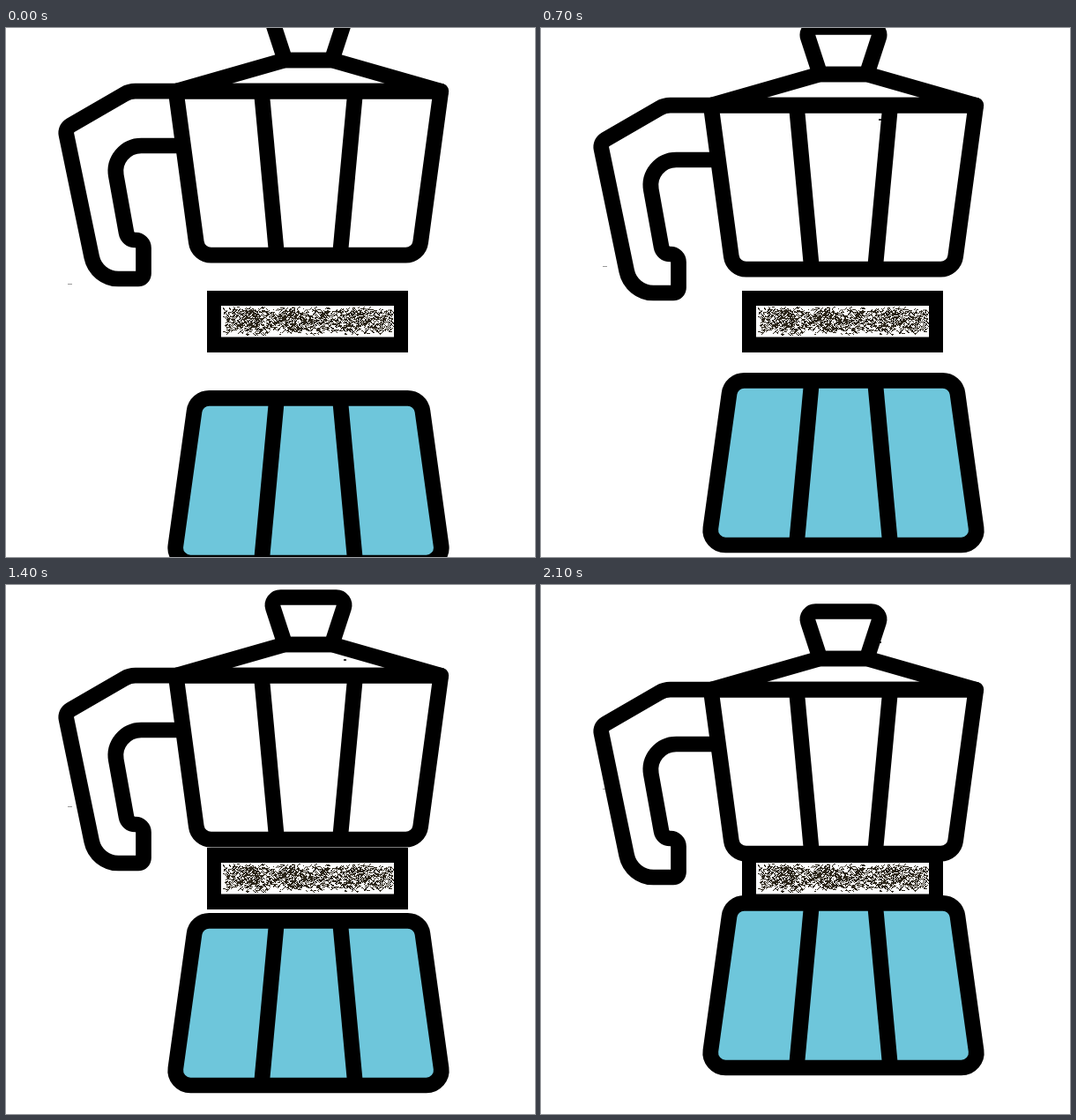
An HTML page with a canvas for the animation above (3100 ms loop, 600 by 600 pixels).

```html
<!DOCTYPE html>
<html lang="en">
<head>
<meta charset="utf-8">
<title>Moka pot</title>
<style>
  html, body { margin: 0; width: 100%; height: 100%; overflow: hidden; background: #fff; }
  canvas { display: block; width: 600px; height: 600px; }
</style>
</head>
<body>
<canvas id="stage" width="600" height="600"></canvas>
<script>
const ctx = document.getElementById('stage').getContext('2d');
const LOOP = 3100, STEP = 100, LAST = 21;
const JUG_TRAVEL = 47, TANK_TRAVEL = -59;
const INK = '#000', WATER = '#6ec6db', COFFEE = '#2b2519';
const AXIS = 343;
const RIM = 71.7, JUG_FLOOR = 257.7, LID = 36.5, KNOB = -17;
const TANK_TOP = 419.8, TANK_FLOOR = 606.5;

// Points are [x, y, corner radius].
function trace(points) {
  const path = new Path2D();
  points.forEach(([x, y, r], i) => {
    if (!i) path.moveTo(x, y);
    else if (r) path.arcTo(x, y, points[i + 1][0], points[i + 1][1], r);
    else path.lineTo(x, y);
  });
  return path;
}

// A closed four-sided shape, symmetric about the axis; it starts mid-edge
// so that every corner can be rounded.
function trapezoid(topHalf, top, topR, floorHalf, floor, floorR) {
  const path = trace([
    [AXIS, top],
    [AXIS + topHalf, top, topR],
    [AXIS + floorHalf, floor, floorR],
    [AXIS - floorHalf, floor, floorR],
    [AXIS - topHalf, top, topR],
    [AXIS, top]
  ]);
  path.closePath();
  return path;
}

function ribs(wideY, narrowY) {
  return [-1, 1].map(side => trace([
    [AXIS + side * 53.2, wideY],
    [AXIS + side * 35.9, narrowY]
  ]));
}

const handle = trace([
  [194, RIM], [140, RIM, 25], [67, 114, 10], [102.3, 284.5, 31],
  [156, 284.5, 6], [156, 240.5, 9], [138, 240.5, 10],
  [118.7, 133.5, 29], [200, 133.5]
]);

const jug = [
  trapezoid(150.3, RIM, 0, 125.2, JUG_FLOOR, 17),
  trapezoid(27, LID, 0, 150.3, RIM, 0),
  trapezoid(44, KNOB, 9, 26.5, LID, 0),
  ...ribs(RIM, JUG_FLOOR),
  handle
];

const tank = trapezoid(127.4, TANK_TOP, 17, 153.3, TANK_FLOOR, 17);
const tankRibs = ribs(TANK_FLOOR, TANK_TOP);

function randomFrom(seed) {
  return () => {
    seed = (seed * 1664525 + 1013904223) >>> 0;
    return seed / 4294967296;
  };
}

// Short slanted dashes, thicker around a few clumps.
function makeGrounds() {
  const rand = randomFrom(41);
  const clumps = [278, 322, 394];
  const path = new Path2D();
  for (let i = 0; i < 1700; i++) {
    const clump = clumps[Math.floor(rand() * clumps.length)];
    const clumped = rand() < 0.2;
    const x = clumped ? clump + (rand() + rand() - 1) * 22 : 246 + rand() * 192;
    const y = 332 + (rand() - 0.5) * 25 + (rand() - 0.5) * 7;
    const lean = Math.floor(rand() * 3) - 1;
    const size = 1 + Math.floor(rand() * 4);
    for (let k = 0; k < size; k++) {
      const px = Math.min(439, Math.floor(x) + k);
      const py = Math.max(316, Math.min(348, Math.floor(y) + lean * k));
      path.rect(px, py, 1, 1);
    }
  }
  return path;
}
const grounds = makeGrounds();

function drawBasket() {
  ctx.fillStyle = INK;
  ctx.fillRect(228, 298, 228, 70);
  ctx.fillStyle = '#fff';
  ctx.fillRect(244, 315, 196, 35.5);
  ctx.fillStyle = COFFEE;
  ctx.fill(grounds);
}

function drawSpecks() {
  ctx.fillStyle = '#999';
  ctx.fillRect(70, 290, 5, 1);
  ctx.fillStyle = '#333';
  ctx.fillRect(383, 123, 3, 2);
}

function drawJug() {
  jug.forEach(path => ctx.stroke(path));
}

function drawTank() {
  ctx.fillStyle = WATER;
  ctx.fill(tank);
  [tank, ...tankRibs].forEach(path => ctx.stroke(path));
}

function shifted(dy, draw) {
  ctx.save();
  ctx.translate(0, dy);
  draw();
  ctx.restore();
}

function render(time) {
  const part = Math.min(LAST, Math.floor((time % LOOP) / STEP)) / LAST;
  const jugY = Math.round(JUG_TRAVEL * part);
  const tankY = Math.round(TANK_TRAVEL * part);
  ctx.fillStyle = '#fff';
  ctx.fillRect(0, 0, 600, 600);
  ctx.strokeStyle = INK;
  ctx.lineWidth = 17.7;
  ctx.lineJoin = 'round';
  shifted(tankY, drawSpecks);
  drawBasket();
  shifted(jugY, drawJug);
  shifted(tankY, drawTank);
}

const start = performance.now();
function tick() {
  render(performance.now() - start);
  requestAnimationFrame(tick);
}
tick();
</script>
</body>
</html>
```
